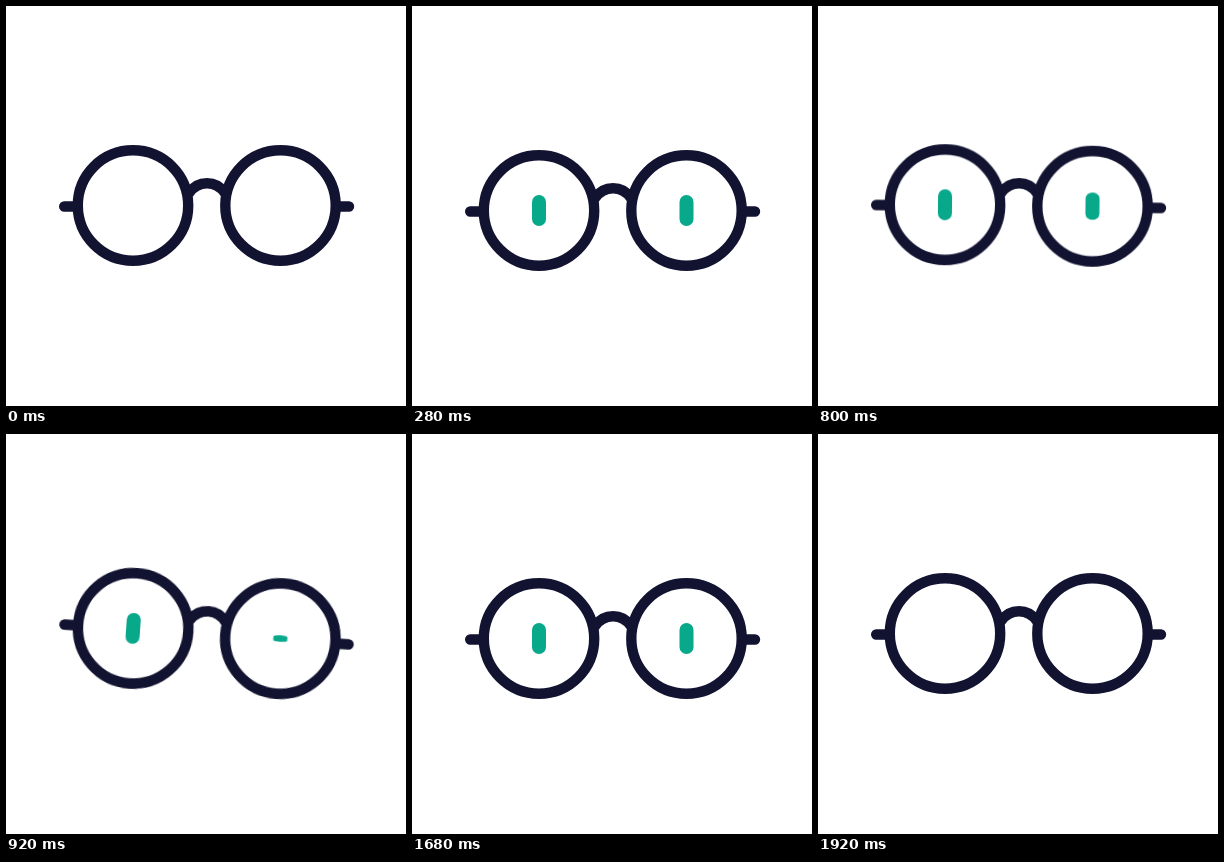
These frames come from a looping animation (400x400 px, 2000 ms). An HTML page without scripts:

```html
<!DOCTYPE html>
<html lang="en">
<head>
<meta charset="utf-8">
<title>Winking glasses</title>
<style>
  html, body { margin: 0; width: 100%; height: 100%; overflow: hidden; background: #fff; }
  svg { display: block; width: 100%; height: 100%; }

  .frame { fill: none; stroke: #121331; stroke-width: 10.4; stroke-linecap: round; }
  .pupil { fill: #08a88a; }

  /* Poses change at 25 per second: 2% of the loop each */
  .bob, .tilt, .blink, .wink { animation: 2s step-end infinite; }
  .bob { animation-name: bob; }
  .tilt { animation-name: tilt; transform-origin: 200.75px 199.5px; }
  .blink { animation-name: blink; transform-origin: 200px 199.5px; }
  .wink { animation-name: wink; transform-origin: 274.5px 199.5px; }

  /* Hop in, settle, then dip and rebound at the end */
  @keyframes bob {
    0% { transform: none; }
    2% { transform: translateY(-2.5px); }
    4% { transform: translateY(-8.5px); }
    6% { transform: translateY(-14.5px); }
    8% { transform: translateY(-17px); }
    10% { transform: translateY(-13px); }
    12% { transform: translateY(-4px); }
    14% { transform: translateY(5px); }
    16% { transform: translateY(9.5px); }
    18% { transform: translateY(7px); }
    20% { transform: translateY(2.5px); }
    22% { transform: none; }
    84% { transform: translateY(5px); }
    86% { transform: translateY(9.5px); }
    88% { transform: translateY(6px); }
    90% { transform: translateY(-.5px); }
    92% { transform: translateY(-4px); }
    94% { transform: translateY(-2px); }
    96%, 100% { transform: none; }
  }

  @keyframes tilt {
    0% { transform: none; }
    40%, 60% { transform: rotate(.6deg); }
    42%, 58% { transform: rotate(2deg); }
    44%, 56% { transform: rotate(3.4deg); }
    46% { transform: rotate(4deg); }
    62%, 100% { transform: none; }
  }

  @keyframes wink {
    0% { transform: none; }
    40%, 60% { transform: scaleY(.89); }
    42%, 58% { transform: scaleY(.61); }
    44%, 56% { transform: scaleY(.33); }
    46% { transform: scaleY(.22); }
    62%, 100% { transform: none; }
  }

  @keyframes blink {
    0% { transform: scaleY(0); }
    6%, 90% { transform: scaleY(.15); }
    8%, 88% { transform: scaleY(.5); }
    10%, 86% { transform: scaleY(.85); }
    12% { transform: none; }
    92%, 100% { transform: scaleY(0); }
  }
</style>
</head>
<body>
<svg viewBox="0 0 400 400">
  <g class="bob">
    <g class="tilt">
      <g class="frame">
        <circle cx="127" cy="199.5" r="55.2"/>
        <circle cx="274.5" cy="199.5" r="55.2"/>
        <path d="M183 187C192 174 210 174 219 187"/>
        <path d="M58.2 200.5H70M332 200.5H343"/>
      </g>
      <g class="pupil blink">
        <rect x="120" y="184" width="14" height="31" rx="7"/>
        <rect class="wink" x="267.5" y="184" width="14" height="31" rx="7"/>
      </g>
    </g>
  </g>
</svg>
</body>
</html>
```
